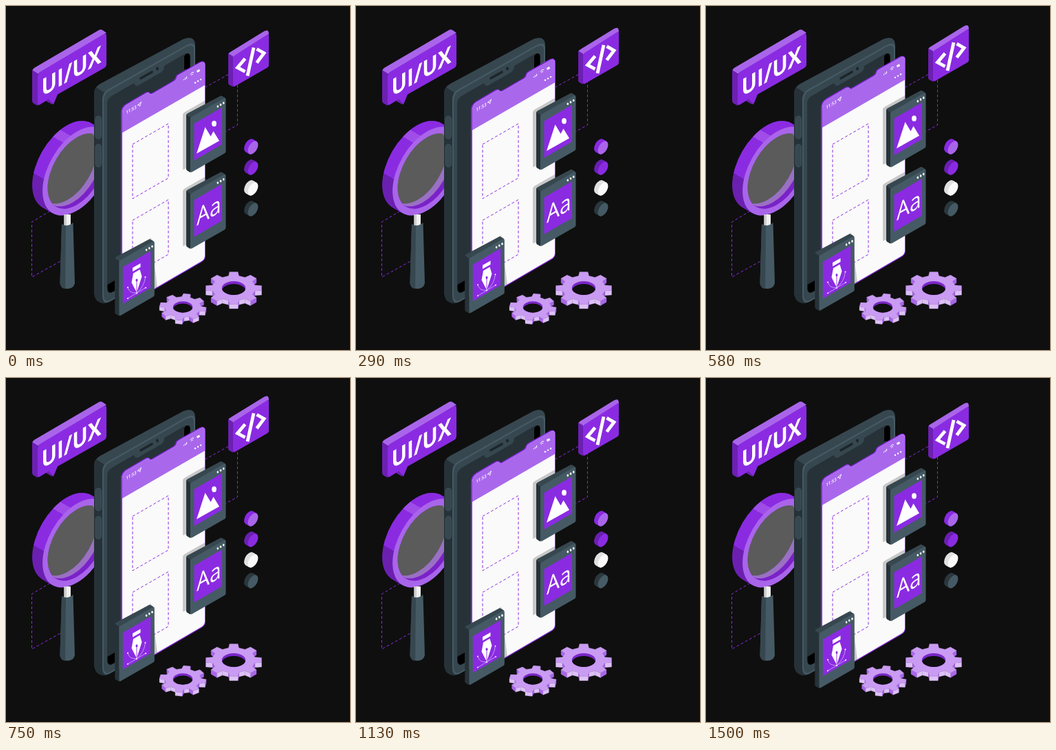
Write an HTML page that moves like this. It is 500 px wide and 500 px high and loops after 1.54 s.

```html
<!DOCTYPE html>
<html lang="en">
<head>
<meta charset="utf-8">
<title>UI/UX</title>
<style>
html, body { margin: 0; width: 100%; height: 100%; overflow: hidden; background: #0f0f0f; }
svg { display: block; width: 100vw; height: 100vh; }
text { font-family: "Open Sans", "Noto Sans", sans-serif; fill: #fff; }
.dash { fill: none; stroke: #8a2be2; stroke-width: 1; stroke-dasharray: 4 3; }
.line { fill: none; stroke: #fff; }
</style>
</head>
<body>
<svg viewBox="0 0 500 500">
  <defs>
    <path id="sheet" d="M169 156Q169 148 175 144L204 127Q207 125.500 208.500 127.500Q210 129.500 213 128L244 110Q248 107.500 248.500 104Q249 101.500 252 100L282 83Q289 79 289 87V363Q289 368 284 371L169 438Z"/>
    <clipPath id="sheetClip"><use href="#sheet"/></clipPath>
    <linearGradient id="rim" x1="1" y1="0" x2="0" y2="1">
      <stop offset=".3" stop-color="#8a2be2"/><stop offset=".3" stop-color="#a04ce8"/>
      <stop offset=".37" stop-color="#a04ce8"/><stop offset=".37" stop-color="#8a2be2"/>
      <stop offset=".67" stop-color="#8a2be2"/><stop offset=".67" stop-color="#6c20b2"/>
    </linearGradient>
    <path id="shadow" d="M257 158Q257 156 260 154L304 129L314 210L262 236L257 238Z" opacity=".2"/>
    <g id="tile">
      <path fill="#37474f" d="M262 159Q262 157 264 156L312 130.5Q314 130 319 134L268 164Z"/>
      <path fill="#263238" d="M262 158L268 162V242L263 239Q262 238 262 237Z"/>
      <path fill="#455a64" d="M268 164Q268 162 270 161L317 134Q319.500 133 319.500 136V211Q319.500 213 318 214L270 241.500Q268 242.500 268 240Z"/>
      <path fill="#8a2be2" d="M273.500 171L314 147.500V201L273.500 224.500Z"/>
      <g fill="#fff"><ellipse cx="307.800" cy="146" rx="1.300" ry="1.800"/><ellipse cx="312" cy="143.500" rx="1.300" ry="1.800"/><ellipse cx="316.200" cy="141" rx="1.300" ry="1.800"/></g>
    </g>
  </defs>
  <rect width="500" height="500" fill="#0f0f0f"/>

  <path class="dash" d="M64 298L37.500 314V394L80 370.500"/>
  <path class="dash" d="M289 118.500L336.500 92V173L319 182.500"/>

  <g id="bubble">
    <path fill="#a965ea" d="M38 95Q38 92 41 90L135 35Q138 33.500 141 35.500L146 39L46 99Z"/>
    <path fill="#6c20b2" d="M38 93L46 98V145L40 141.500Q38 140 38 138ZM62 135L69 143L66 142.500L58 138Z"/>
    <path fill="#8a2be2" d="M46 101Q46 98 49 96L142 41Q146 39 146 43V84Q146 88 143 90L75 128.500L69 143L62 135.500L49 143.500Q46 145 46 142Z"/>
    <text transform="matrix(.866 -.5 0 1 51.500 132)" font-size="34.500" font-weight="700">UI/UX</text>
  </g>

  <g id="lens"></g>
  <path fill="#f0f0f0" d="M84.500 303H94V319H84.500Z"/>
  <path fill="#cfcfcf" d="M84.500 303H88V319H84.500Z"/>
  <path fill="#455a64" d="M81 317Q89 322 97.500 315L100 403Q98 411 89 411Q79 410 78.500 403Z"/>
  <path fill="#37474f" d="M81 317Q84 320 87 319.500L86 411Q79 410 78.500 403Z"/>

  <g id="phone">
    <path fill="#37474f" d="M128 128Q128 118 137 113L258 48Q275 42 275 58V360L150 430Q140 435 133 428Q128 424 128 414Z"/>
    <path fill="#263238" d="M128 128Q128 121 131 118L143 126Q140 130 140 136V420Q140 428 144 432Q138 433 133 429Q128 425 128 414Z"/>
    <path fill="#455a64" d="M140 137Q140 126 149 121L262 57Q275 50 275 62V360L150 430Q140 434 140 420Z"/>
    <path fill="#37474f" d="M142 138Q142 128 150 123L262 59.500Q273 54 273 64V360L150 428Q142 431 142 420Z"/>
    <path fill="#263238" d="M147 142Q147 135 153 131L186 112Q188 118 193 115L226 96Q230 93 230 87L259 70Q268 66 268 74V350L155 415Q147 419 147 410Z"/>
    <path d="M259 74Q260 69.500 264 69Q267.500 69 267.500 74V92H259ZM147.500 405L158 399V414L153 416.500Q147.500 418 147.500 410Z"/>
    <path stroke="#1c262b" stroke-width="3.600" stroke-linecap="round" d="M196 105L212 96"/>
    <ellipse cx="220" cy="91" rx="2" ry="2.600" fill="#1c262b"/>
    <g fill="#37474f" stroke="#455a64" stroke-width=".7">
      <rect x="130" y="160" width="8.500" height="33" rx="4.200"/><rect x="130" y="201" width="8.500" height="33" rx="4.200"/>
    </g>
  </g>

  <g class="float">
    <use href="#sheet" x="-.5" fill="#8a2be2" stroke="#8a2be2" stroke-width="3"/>
    <use href="#sheet" fill="#fafafa"/>
    <g clip-path="url(#sheetClip)">
      <path fill="#a968eb" d="M160 60H295V111.500L160 189.500Z"/>
      <use href="#shadow"/><use href="#shadow" y="111"/><use href="#shadow" x="-93" y="208"/>
    </g>
    <text transform="matrix(.866 -.5 0 1 174.500 157.500)" font-size="6.800" font-weight="600">11:53</text>
    <path class="line" stroke-width=".9" d="M191 144.500L196.500 139.500L194.500 146L193.500 143.500Z"/>
    <path class="line" stroke-width="1" d="M258.500 108V106.500M260.500 107V104.500M262.500 106V102.500M268 99.500Q270.500 95 273 96.500M269.300 101Q270.500 98.500 272 99"/>
    <path class="line" stroke-width="3" d="M277.500 95.500L281.500 93.200"/>
    <g fill="#fff"><circle cx="275" cy="111.500" r="1.200"/><circle cx="279" cy="109.200" r="1.200"/><circle cx="283" cy="106.900" r="1.200"/></g>
  </g>

  <path class="dash" d="M184 201L236 171V250L184 280Z"/>
  <path class="dash" d="M184 311.500L236 281.500V361L184 391Z"/>

  <g class="float">
    <use href="#tile"/>
    <path fill="#fff" d="M277 214.500L289.500 176L297.500 189.500L301.500 182L310 196Z"/>
    <ellipse cx="302.500" cy="171" rx="3.400" ry="4.200" fill="#fff"/>

    <use href="#tile" y="111"/>
    <text transform="matrix(.866 -.5 0 1 277 319.500)" font-size="34.500" font-weight="500">Aa</text>

    <use href="#tile" x="-103.700" y="208.500"/>
    <path fill="#fff" d="M184 380.500L195.500 374V379.500L184 386ZM185 388.500L194.500 383L197.500 393L190 416.500L182.500 402Z"/>
    <path stroke="#8a2be2" stroke-width=".9" d="M190 399V415"/>
    <ellipse cx="190" cy="398.500" rx="1.500" ry="2" fill="#8a2be2"/>
    <path class="line" stroke-width=".5" d="M177 409Q179 418 190 417Q201 408 202.500 394M177 425L203 409.500"/>
    <path class="line" stroke-width="1.600" d="M176.200 409.500L177.800 408.500M201.700 394.500L203.300 393.500M176.200 425.500L177.800 424.500M202.200 410L203.800 409M189.200 418L190.800 417"/>

    <path fill="#a965ea" d="M323 71Q323 69 325 67.500L373 38Q376 35.500 379 35.500Q382 35.500 382 41L330 75Z"/>
    <path fill="#6c20b2" d="M323 69L330 73V117.500L325 115Q323 114 323 112Z"/>
    <path fill="#8a2be2" d="M330 75.500Q330 73.500 332 72L379 42Q382 40 382 43V86Q382 88 380 89.500L333 116.500Q330 118 330 115Z"/>
    <path class="line" stroke-width="4.800" d="M347.500 76.500L336.500 89.500L347.500 95.500M360 60.500L351 101.500M364.500 62.500L375 68.500L364.500 82.500"/>
  </g>

  <g id="discs"></g>
  <g id="gears"></g>
</svg>
<script>
const $ = id => document.getElementById(id);

// Circle lying in the upright isometric plane
const disc = (x, y, r, fill) =>
  `<circle r="${r}" fill="${fill}" transform="matrix(.866 -.5 0 1 ${x} ${y})"/>`;

// Circle swept from (x - dx) to x, with a differently coloured face
function cylinder(x, y, r, dx, side, face) {
  let out = "";
  for (let d = dx; d > 0; d -= 0.5) out += disc(x - d, y - d * 0.577, r, side);
  return out + disc(x, y, r, face);
}

$("lens").innerHTML =
  `<clipPath id="hole">${disc(103, 240, 49, "#000")}</clipPath>` +
  cylinder(103, 240, 57.6, 15, "url(#rim)", "#a965ea") +
  disc(103, 240, 49, "#7a22c8") +
  `<g clip-path="url(#hole)">${disc(97, 236.5, 49, "#9a70c4")}${disc(90, 232.5, 49, "#5b5b5b")}</g>`;

$("discs").innerHTML = [
  ["#8a2be2", "#a965ea"], ["#6c20b2", "#8a2be2"], ["#e0e0e0", "#fafafa"], ["#2c393f", "#455a64"]
].map(([side, face], i) => cylinder(359, 206 + 30 * i, 8.6, 5.5, side, face)).join("");

// Gear lying on the ground: side walls by facing direction, then the top
function gear(id, cx, cy, r, turn, depth) {
  const points = [];
  for (let i = 0; i < 8; i++)
    for (const [a, k] of [[-0.24, 0.77], [-0.15, 1], [0.15, 1], [0.24, 0.77]]) {
      const t = turn + i * Math.PI / 4 + a;
      points.push([cx + r * k * Math.cos(t), cy + r * k * Math.sin(t) * 0.577]);
    }
  const polygon = (list, fill) =>
    `<polygon points="${list.map(p => p.map(v => v.toFixed(1))).join(" ")}" fill="${fill}" stroke="${fill}" stroke-width=".3"/>`;
  const walls = points
    .map((p, i) => [p, points[(i + 1) % points.length]])
    .filter(([p, q]) => q[0] < p[0])
    .sort((a, b) => a[0][1] + a[1][1] - b[0][1] - b[1][1])
    .map(([p, q]) => polygon([p, q, [q[0], q[1] + depth], [p[0], p[1] + depth]],
      p[0] - q[0] > 2 * Math.abs(q[1] - p[1]) ? "#dcc0f7" : "#a965ea"));
  const hole = (dy, fill) =>
    `<ellipse cx="${cx}" cy="${cy + dy}" rx="${r * 0.42}" ry="${r * 0.242}" fill="${fill}"/>`;
  return `<clipPath id="${id}">${hole(0, "#000")}</clipPath>` + walls.join("") +
    polygon(points, "#c99bf2") + hole(0, "#7a28c8") +
    `<g clip-path="url(#${id})">${hole(depth * 0.6, "#0f0f0f")}</g>`;
}
$("gears").innerHTML = gear("big", 331, 410, 41, 0, 6.5) + gear("small", 257, 437.5, 34, 0.18, 5.5);

// Linear bob, 10 units high, stepped at 24 per second
const LOOP = 1540, STEPS = 37;
const floats = document.querySelectorAll(".float");
function draw(now) {
  const step = Math.min(STEPS - 1, Math.floor((now % LOOP) * 0.024 + 0.1));
  const y = 10 * Math.abs(1 - (step + 1) / (STEPS / 2)) - 9.5;
  floats.forEach(g => g.setAttribute("transform", `translate(0 ${y.toFixed(2)})`));
  requestAnimationFrame(draw);
}
draw(0);
</script>
</body>
</html>
```
